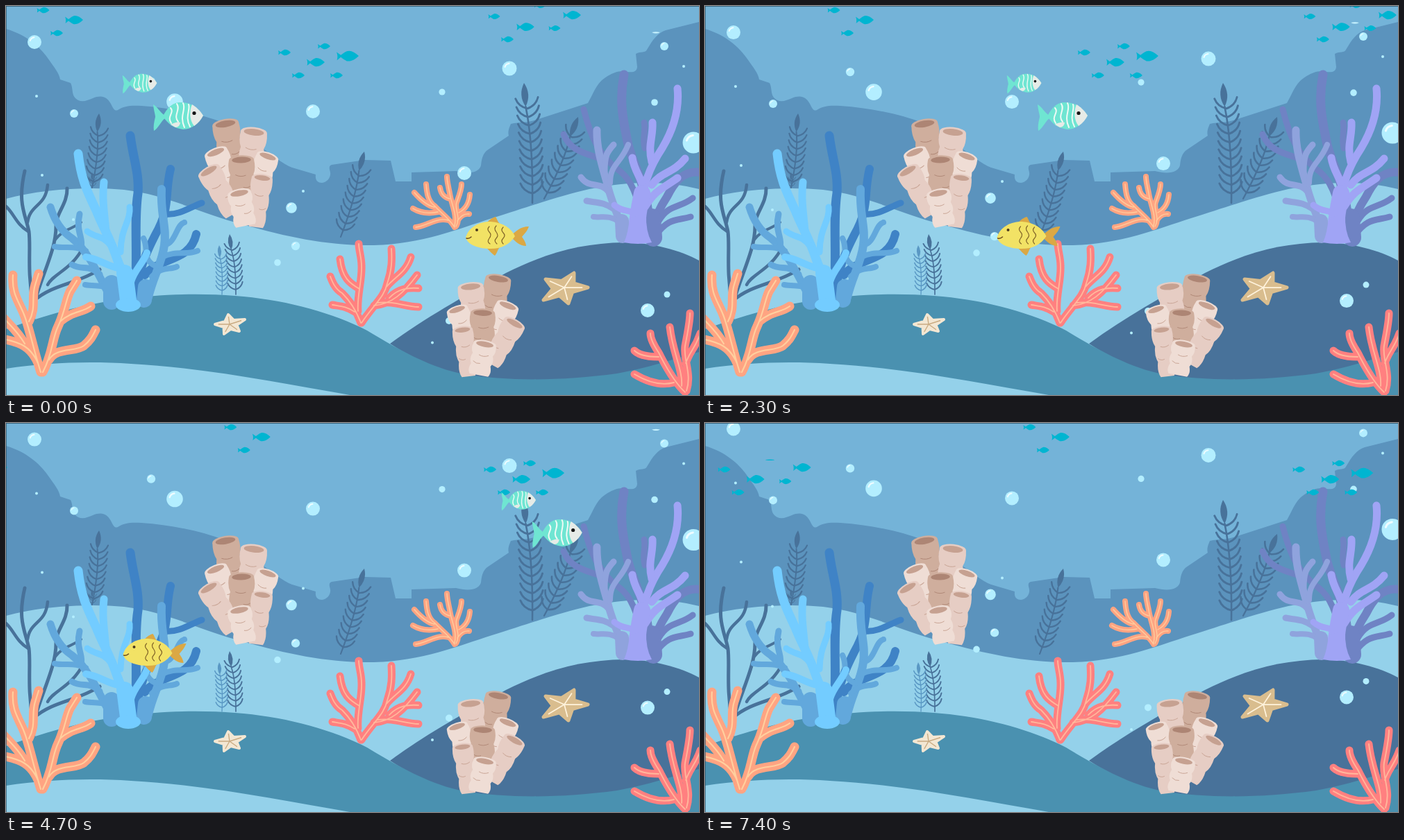
Recreate the animation shown at these times as an HTML page. Size 998x561 px, loop 7.5 s.

```html
<!DOCTYPE html>
<html lang="en">
<head>
<meta charset="utf-8">
<title>Coral reef</title>
<style>
html, body { margin: 0; width: 100%; height: 100%; overflow: hidden; background: #74b3d8; }
svg { display: block; width: 100vw; height: 100vh; }
</style>
</head>
<body>
<svg id="stage" viewBox="0 0 998 561" preserveAspectRatio="none"></svg>
<script>
const LOOP = 7500, STEP = 100, MOTION_END = 7210;

const fill = (d, color) => `<path d="${d}" fill="${color}"/>`;
const line = (d, color, width) =>
  `<path d="${d}" fill="none" stroke="${color}" stroke-width="${width}" stroke-linecap="round" stroke-linejoin="round"/>`;
const oval = (x, y, rx, ry, color, extra = '') =>
  `<ellipse cx="${x}" cy="${y}" rx="${rx}" ry="${ry}" fill="${color}" ${extra}/>`;
const group = (transform, body) => `<g transform="${transform}">${body}</g>`;

// Each branch is "width:path".
const branches = (color, list) => list.map(b => {
  const [width, d] = b.split(':');
  return line(d, color, width);
}).join('');

const veined = (d, color, width, vein) => line(d, color, width) + line(d, vein, width / 6);

function weed(x0, y0, x1, y1, leaf, color) {
  const len = Math.hypot(x1 - x0, y1 - y0);
  const angle = Math.atan2(x1 - x0, y0 - y1) * 180 / Math.PI;
  const bend = d => leaf * .8 * (d / len) * (1 - d / len);
  let leaves = '';
  for (let d = len * .08; d < len - leaf * 1.9; d += leaf * .68) {
    for (const s of [-1, 1]) {
      leaves += `M${bend(d)} ${-d}q${s * leaf * .7} ${-leaf * .2} ${s * leaf * .9} ${-leaf * .85}`;
    }
  }
  const tip = leaf * 1.9, w = leaf * .55;
  return group(`translate(${x0} ${y0}) rotate(${angle})`,
    line(`M0 0Q${leaf * .4} ${-len / 2} 0 ${-len + tip}`, color, leaf * .14) +
    line(leaves, color, leaf * .16) +
    fill(`M0 ${-len + tip}q${-w} ${-tip * .5} 0 ${-tip}q${w} ${tip * .5} 0 ${tip}z`, color));
}

function tube(x, y, r, x2, y2, r2, color, hole) {
  const len = Math.hypot(x2 - x, y2 - y);
  const angle = Math.atan2(x - x2, y2 - y) * 180 / Math.PI;
  const width = k => r * .92 + (r2 - r * .92) * k;
  const rings = 3;
  let d = `M${-r} 0`;
  for (let i = 0; i < rings; i++) {
    d += `Q${-width((i + .5) / rings) - 4} ${len * (i + .6) / rings} ${-width((i + 1) / rings)} ${len * (i + 1) / rings}`;
  }
  d += `L${r2} ${len}`;
  for (let i = rings; i > 0; i--) {
    d += `Q${width((i - .5) / rings) + 4} ${len * (i - .4) / rings} ${i > 1 ? width((i - 1) / rings) : r} ${len * (i - 1) / rings}`;
  }
  return group(`translate(${x} ${y}) rotate(${angle})`,
    fill(d + 'z', color) + oval(0, 0, r, r * .38, color) + oval(0, 0, r * .76, r * .25, hole) +
    line(`M${-r * .5} ${len * .34}q${r * .4} 4 ${r * .8} 1M${r * .1} ${len * .63}q${r * .3} 2 ${r * .6} -2`, hole, .9));
}

function sponge() {
  const tan = '#cfae9d', pink = '#e6cdc4', pale = '#efddd5', deep = '#ad8574', soft = '#c6a191';
  return tube(316, 170, 19, 328, 240, 16, tan, deep) +
    tube(357, 182, 19, 350, 250, 15, pink, soft) +
    tube(302, 211, 17, 326, 270, 15, pale, soft) +
    tube(377, 217, 16, 358, 272, 14, pale, soft) +
    tube(339, 222, 18, 341, 285, 17, tan, deep) +
    tube(292, 238, 17, 328, 300, 13, pink, soft) +
    tube(369, 248, 15, 360, 319, 10, pink, soft) +
    tube(336, 270, 17, 345, 317, 14, pale, soft);
}

function star(x, y, tips, color, vein, round) {
  const outline = tips.map(([tx, ty], i) => {
    const [nx, ny] = tips[(i + 1) % tips.length];
    return `${tx},${ty} ${x + (tx + nx - 2 * x) * .29},${y + (ty + ny - 2 * y) * .29}`;
  }).join(' ');
  const veins = tips.map(([tx, ty]) => `M${x} ${y}L${x + (tx - x) * .75} ${y + (ty - y) * .75}`).join('');
  return `<polygon points="${outline}" fill="${color}" stroke="${color}" stroke-width="${round}" stroke-linejoin="round"/>` +
    line(veins, vein, round * .35);
}

function backdrop() {
  const deep = '#48729a', light = '#94d1ea', sea = '#5b93bd';
  return `<rect width="998" height="561" fill="#74b3d8"/>` +
    fill('M0 33C28 41 48 58 60 75C70 89 77 98 78 106L93 111C97 119 94 127 100 133C108 141 117 136 125 133C140 127 147 133 152 143C155 149 157 152 161 150C170 144 180 143 195 144C240 147 285 157 312 168C350 184 385 222 412 233L446 243C445 252 449 255 455 255C463 254 468 247 467 240C466 235 464 231 469 229L517 222L554 223L561 253H584V240L648 238C668 243 681 240 684 230C685 218 688 212 693 208L724 187C722 180 726 173 727 170C742 167 752 169 770 162L838 140C845 128 850 112 862 104C872 97 880 94 888 94C900 96 908 97 909 88L907 69C914 65 921 68 923 63C932 48 938 39 950 35L998 23V400H0z', sea) +
    weed(124, 262, 134, 155, 14, deep) + weed(482, 333, 516, 210, 15, deep) +
    weed(758, 284, 746, 111, 18, deep) + weed(775, 278, 824, 160, 16, deep) +
    fill('M0 278C50 264 120 260 170 265C230 272 270 295 330 312C400 332 460 346 530 345C600 343 650 322 700 306C760 287 800 273 840 264C900 252 950 252 998 264V561H0z', light) +
    weed(124, 262, 124, 240, 6, deep) +
    fill('M553 487C600 452 660 418 720 385C780 355 830 342 890 341C930 341 970 352 998 367V561H700C640 540 590 510 553 487z', deep) +
    weed(331, 416, 322, 329, 12, deep) + weed(311, 416, 307, 345, 9.5, '#5a98c4') +
    branches(deep, ['5:M40 465L39 430C30 380 36 350 33 325C28 300 16 285 27 238', '4.5:M0 289C12 300 15 315 32 325',
      '4.5:M31 312C35 285 57 290 60 258', '5:M40 430C55 380 72 350 72 318C71 300 89 285 88 263',
      '4:M70 338C82 322 95 322 108 312', '5:M40 425C70 400 100 402 135 380', '4.5:M60 402C68 386 95 380 111 348']) +
    fill('M0 466C40 452 100 432 160 424C220 415 280 414 330 418C400 423 470 442 520 468C560 492 610 522 660 531C720 541 800 541 880 530C930 521 970 506 998 499V561H0z', '#4a91b0') +
    fill('M0 523C60 514 120 512 180 516C290 522 400 545 495 561H0z', light);
}

function blueCoral() {
  return branches('#3f83c6', ['13:M179 187C183 220 192 240 190 270C184 310 190 350 186 425',
      '12:M237 235C228 270 238 290 215 330C205 350 195 370 190 400', '9:M230 300C250 302 265 290 282 284',
      '12:M200 388C220 362 265 370 274 329']) +
    branches('#62a8dc', ['11:M64 290C70 310 80 325 95 335C115 350 130 380 150 420', '8:M70 347C85 350 100 345 115 353',
      '9:M95 373C110 382 120 372 135 387', '8:M114 402C130 405 140 400 150 412', '9:M108 348C112 335 100 325 106 300',
      '12:M205 420C212 390 225 370 228 345C232 320 222 300 224 264', '8:M215 375C195 365 206 350 198 335',
      '8:M228 345C245 342 245 315 257 312', '8:M225 362C245 352 260 360 276 353', '8:M210 390C225 375 235 381 246 376',
      '24:M152 400V426', '22:M201 405L199 424']) +
    branches('#73ccff', ['13:M104 213C108 250 118 270 130 295C140 320 150 335 160 365C170 390 174 400 176 430',
      '11:M141 254C138 280 142 300 144 325', '9:M178 290C180 310 165 320 165 355', '9:M117 325C130 335 140 330 152 347',
      '10:M115 362C135 365 145 375 162 378', '10:M203 356C195 375 185 380 180 398', '24:M171 385L176 424']) +
    oval(176, 431, 18, 10, '#73ccff');
}

function purpleCoral() {
  return branches('#6f83c4', ['13:M890 99C882 140 890 170 896 200C905 235 925 260 928 330', '9:M832 149C842 190 855 215 880 235C895 245 905 260 915 300',
      '9:M803 185C813 210 835 212 860 222', '12:M1000 240C975 236 962 255 952 275C942 290 935 305 932 320',
      '9:M989 277C970 292 955 285 940 310', '9:M986 304C965 310 955 305 936 330', '9:M920 205C916 190 922 180 919 168', '26:M930 305L932 334']) +
    branches('#8fa3dd', ['11:M851 179C850 210 862 240 868 265C875 290 885 310 890 332', '9:M875 200C866 210 862 215 862 238',
      '8:M896 200C885 228 870 228 870 255', '9:M828 247C840 264 855 252 868 268', '9:M836 281C850 284 860 282 876 293',
      '8:M846 304C858 306 868 300 884 312', '20:M887 310L888 332']) +
    branches('#a0a4f5', ['11:M967 119C970 150 960 180 945 205C925 235 918 260 914 290', '11:M931 168C932 190 924 200 930 225',
      '11:M902 219C905 240 918 250 918 268', '11:M978 220C960 242 945 238 930 258', '11:M967 248C945 264 935 265 920 290',
      '9:M876 287C890 300 900 290 910 305', '24:M916 270C912 290 908 310 909 328']) +
    fill('M898 305Q896 328 890 341Q910 345 930 341Q921 325 922 300z', '#a0a4f5');
}

function corals() {
  const pink = '#ff8080', orange = '#ffa482', blush = '#ffb89c', cream = '#ffcf9e';
  const centre = 'M511 457C503 435 490 420 484 414C474 408 470 398 467 390M502 441C490 433 482 433 470 431M507 440C505 420 513 395 512 375C512 362 508 352 508 343M509 408C495 400 484 392 481 365M512 457C530 430 545 420 549 400C556 380 556 365 555 350M548 405C560 390 576 385 583 362M530 432C555 430 572 415 592 388M552 421C565 407 580 406 594 407M535 428C560 425 575 434 594 434';
  const distant = 'M646 319C640 308 628 300 617 288C608 282 606 270 605 257M617 290C607 288 595 277 588 269M622 297C608 300 596 298 586 292M637 309C620 304 605 318 590 319M646 317C650 300 641 285 639 270C637 260 635 252 635 246M639 278C628 275 626 268 625 262M648 318C656 305 645 292 649 283C653 272 656 265 656 257M652 298C662 293 667 285 668 272M650 310C655 302 660 299 667 300';
  const left = 'M50 528C38 490 34 465 26 445C18 425 8 415 10 388M33 455C44 435 36 420 42 402L47 386M46 515C36 492 22 485 -6 480M27 487C15 467 5 460 -6 447M53 528C68 500 66 480 75 462C85 440 86 425 92 412L102 396M78 455C95 440 110 442 122 433M62 510C72 492 100 499 112 490C122 482 125 475 129 467';
  const right = 'M978 557C965 545 950 520 940 500C930 485 928 478 928 472M940 506C925 506 912 504 905 497M962 543C940 549 920 540 905 531M973 548C975 525 960 500 956 463M980 555C988 530 975 510 978 490C982 470 985 455 985 443M979 515C985 497 992 495 1000 472';
  return veined(distant, orange, 8, cream) + blueCoral() + purpleCoral() + sponge() +
    veined(centre, pink, 11, blush) + veined(left, orange, 13, cream) + veined(right, pink, 11, blush) +
    star(804, 406, [[818, 385], [838, 406], [810, 429], [774, 424], [777, 394]], '#d9bd8e', '#fff3dc', 5) +
    star(322, 459, [[320, 445], [344, 452], [336, 469], [314, 473], [301, 459]], '#f3e7d3', '#c9ab82', 4);
}

// Bubbles: x, y, radius
const bubbles = [[41, 52, 10], [44, 130, 2], [98, 155, 6], [209, 109, 6.2], [243, 138, 11.8], [442, 152, 10], [628, 124, 4.6],
  [660, 241, 10], [725, 90, 10.5], [948, 58, 6], [976, 87, 2], [934, 139, 4.8], [990, 197, 15.5], [411, 291, 7.8], [428, 267, 2],
  [417, 346, 6.2], [391, 370, 4.8], [52, 244, 2], [97, 308, 2], [924, 439, 10], [952, 416, 4.5], [614, 485.5, 2], [638, 454, 5]];

function bubble([x, y, r]) {
  const shine = r > 5.5
    ? line(`M${x - r * .62} ${y - r * .2}Q${x - r * .5} ${y - r * .62} ${x - r * .05} ${y - r * .68}`, '#eefcff', r * .2) : '';
  return `<circle cx="${x}" cy="${y}" r="${r}" fill="#b3eeff"/>` + shine;
}

const minnow = (x, y, w) => group(`translate(${x} ${y}) scale(${w / 26})`,
  fill('M13 0C8 -5 3 -7 -1 -5.5C-4 -4.5 -6 -2 -8 -1L-13 -4.5Q-11 0 -12.500 5L-8 1.500C-5 4 -3 5 -1 6C4 7 9 4 13 0z', '#00b5d1'));
const school = list => list.map(m => minnow(...m)).join('');

const striped = (x, y, scale) => group(`translate(${x} ${y}) scale(${scale})`,
  fill('M-24 0C-31 -4 -35 -13 -41 -16C-40 -6 -38 -2 -38 2C-40 10 -41 16 -40 22C-33 18 -30 8 -24 4z', '#6fe5d2') +
  fill('M31 0C22 -14 10 -20 -4 -19C-15 -18 -22 -9 -27 1C-20 12 -12 18 2 20C15 20 24 11 31 0z', '#6fe5d2') +
  fill('M31 0C26 -8 20 -13 15 -16C11 -7 11 7 18 15C24 11 28 6 31 0z', '#e6ebe7') +
  line('M-16 -11C-10 -4 -22 1 -15 11M-7 -17C-1 -8 -13 0 -5 9M2 -18C7 -9 -4 0 4 17M10 -16C13 -8 4 1 12 16', '#eefaf5', 2) +
  fill('M-16 13Q-7 8 -2 10Q-3 17 -9 17z', '#e6ebe7') +
  `<circle cx="18" cy="-3.500" r="2.600" fill="#151515"/>`);

const yellowFish = () =>
  fill('M689 316C695 310 698 306 705 304C708 308 708 314 716 317zM690 347C695 351 698 356 704 360C709 354 707 351 713 346zM727 331C735 325 740 318 753 318C750 326 746 329 743 333C746 337 749 342 749 346C740 346 734 340 727 333z', '#dba844') +
  fill('M662 334C666 319 681 311 698 311C716 312 728 321 733 332C725 344 714 350 698 350C679 350 665 344 662 334z', '#f2e265') +
  line('M696 318q-4 4 0 8t0 9t1 8M706 317q-4 4 0 9t0 9t1 8M716 319q-4 4 0 8t0 8t0 8', '#806428', 1.2) +
  line('M663 335Q667 336 670 333', '#6b4b20', 1.5) + `<circle cx="678" cy="323" r="2" fill="#4a3820"/>`;

const smallFish = 18;
// Moving parts in paint order; speeds in px per second.
const layers = [
  { art: backdrop() + corals() },
  { art: bubbles.map(bubble).join('') + fill('M930 38Q936 41 942 38Q936 36.500 930 38z', '#c9f4ff'), vy: -6.05 },
  { art: group('translate(1016.8 233.3) scale(-.974 .943)', sponge()) },
  { art: school([[53.5, 6, smallFish], [98, 20, 26], [73, 39, smallFish]]), vx: 57.4 },
  { art: school([[401, 67, smallFish], [458, 58, smallFish], [446, 81, 26], [492, 72, 32], [421, 100, smallFish], [476, 100, smallFish]]), vx: 63 },
  { art: school([[703, 15, 17], [748, 30, 25.5], [815, 13, 26], [790, 32, 17], [722, 48, 18], [769, -1, 17]]), vx: 73 },
  { art: school([[-293, 64, 26], [-317, 84, 17.5], [-360, 81, 26], [-385, 100, smallFish], [-405, 67, smallFish]]) + oval(-339, 53.3, 6.5, .7, '#00b5d1'), vx: 60 },
  { art: striped(196, 111, .69) + striped(253, 158, 1), vx: 116.1 },
  { art: yellowFish(), vx: -105 },
  { art: line('M0 .4H998M.3 0V561', '#2f566d', .9) }
];

const stage = document.getElementById('stage');
stage.innerHTML = layers.map(l => `<g>${l.art}</g>`).join('');
layers.forEach((l, i) => l.node = stage.children[i]);

function draw(ms) {
  const s = Math.min(ms, MOTION_END) / 1000;
  for (const { node, vx = 0, vy = 0 } of layers) {
    if (vx || vy) node.setAttribute('transform', `translate(${vx * s} ${vy * s})`);
  }
}

const start = performance.now();
function tick() {
  // A small lead keeps the ten-per-second steps on time despite refresh delay.
  const elapsed = (performance.now() - start + 20) % LOOP;
  draw(Math.floor(elapsed / STEP) * STEP);
  requestAnimationFrame(tick);
}
draw(0);
requestAnimationFrame(tick);
</script>
</body>
</html>
```
